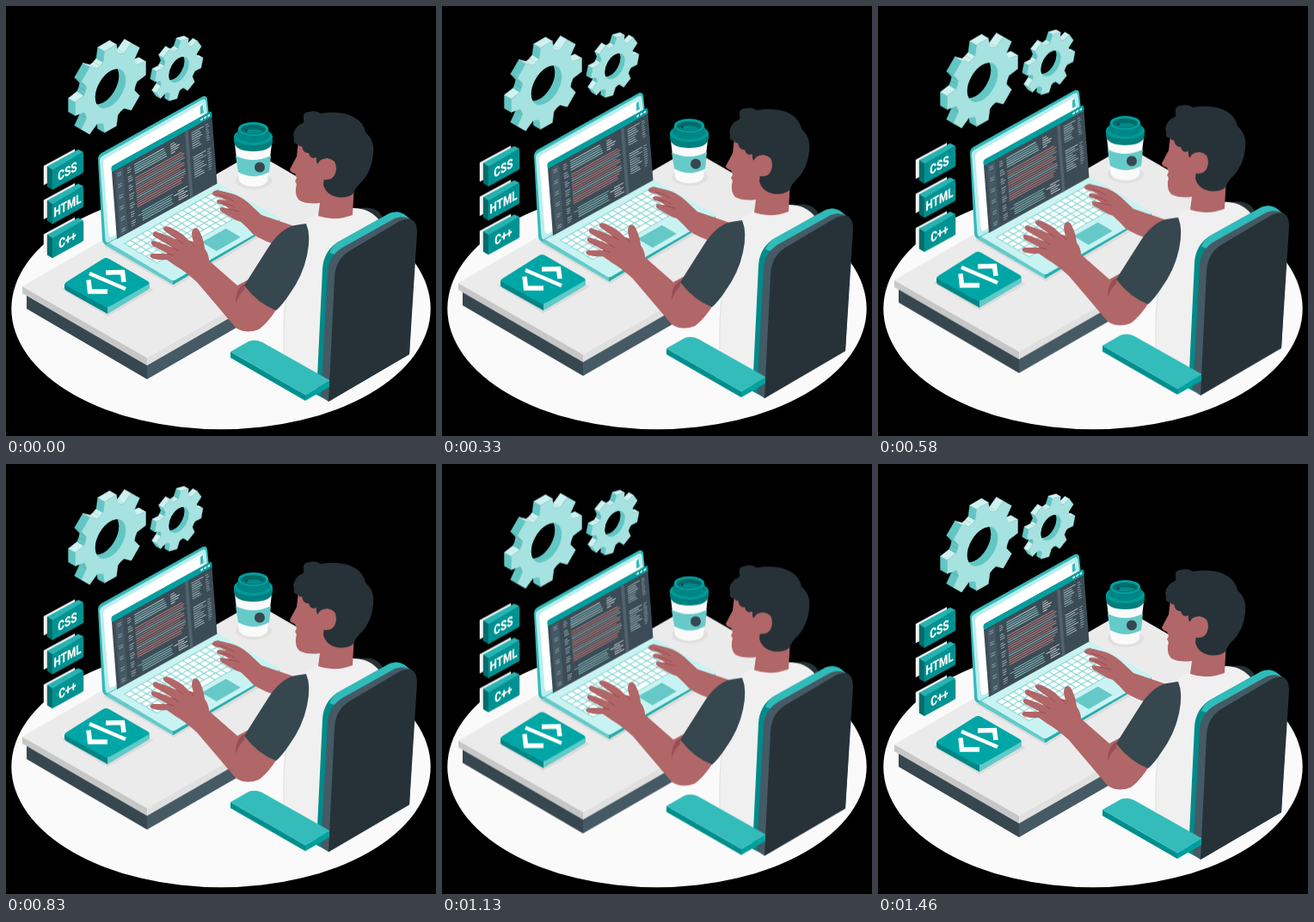
An HTML page that plays this animation: 500 px wide and 500 px high, repeating every 1500 ms.

```html
<!DOCTYPE html>
<html lang="en">
<head>
<meta charset="utf-8">
<title>Programmer at a desk</title>
<style>
  html, body { margin: 0; width: 100%; height: 100%; overflow: hidden; background: #000; }
  svg { display: block; width: 100vw; height: 100vh; }
  #scene { animation: float .75s steps(18, jump-none) infinite alternate; }
  @keyframes float { to { transform: translateY(-9.444px); } }
  .tag { font: 900 15.5px "Roboto", "Liberation Sans", sans-serif; fill: #fff; text-anchor: middle; }
  .skin { fill: #b16668; }
  .fold { fill: none; stroke: #964f55; stroke-width: 1; stroke-linecap: round; }
</style>
</head>
<body>
<svg viewBox="0 0 500 500">
  <ellipse cx="250" cy="352" rx="243.700" ry="140.300" fill="#fafafa"/>
  <g id="scene">
    <g id="gears"></g>

    <g id="desk">
      <path d="M24 335L164 416V434L24 352Z" fill="#37474f"/>
      <path d="M164 416L300 338V355.500L164 434Z" fill="#455a64"/>
      <path d="M19 326L164 409V418L19 334Z" fill="#c7c7c7"/>
      <path d="M164 409L310 325V334L164 418Z" fill="#e0e0e0"/>
      <path d="M19 326L289 170L400 234L310 325L164 409Z" fill="#ebebeb"/>
    </g>

    <g id="tags"></g>

    <g id="tile" stroke-linejoin="round">
      <path d="M66 329L116 300L170 330L118 360Z" fill="#dcdcdc" stroke="#dcdcdc" stroke-width="2"/>
      <path d="M68 323L118 350V358L70 331Q68 330 68 328Z" fill="#008686"/>
      <path d="M118 350L167 322V327Q167 329 165 330L118 358Z" fill="#5fcac8"/>
      <path d="M70 321L112 294.500Q116 292 120 294L165 320Q168 322 165 324L122 348.500Q118 351 114 349L70 325Q67 323 70 321Z" fill="#00a6a6"/>
      <g fill="none" stroke="#fff" stroke-width="5.500" stroke-linejoin="miter">
        <path d="M97 311L139 329" stroke-width="4.500"/>
        <path d="M116 310L135.500 309.500L137 321"/>
        <path d="M96 318.500L97.500 332L118 332"/>
      </g>
    </g>

    <g id="cup">
      <ellipse cx="288" cy="203" rx="21" ry="10" fill="#e0e0e0"/>
      <path d="M266 160L271 203Q275 210 288 210Q301 210 304 203L309 160Z" fill="#fafafa"/>
      <path d="M267 174Q287 184 308 174L306 193Q288 203 270 193Z" fill="#66cac9"/>
      <circle cx="295" cy="187.500" r="6" fill="#37474f"/>
      <path d="M265 151V158Q267 169 287.500 169Q308 169 310 158V151Z" fill="#007f7e"/>
      <ellipse cx="287.500" cy="152" rx="22.500" ry="10" fill="#009a99"/>
      <path d="M270 143L268 152Q275 159 288 159Q300 159 307 152L305 143Z" fill="#008685"/>
      <ellipse cx="287.500" cy="143" rx="17.500" ry="8" fill="#00a3a2"/>
      <ellipse cx="287.500" cy="143.500" rx="14.500" ry="5.800" fill="#006a69"/>
      <path d="M275 146Q287 140 300 146Q288 151 275 146Z" fill="#008b8a"/>
      <circle cx="279.500" cy="145" r="1.200" fill="#263238"/>
    </g>

    <g id="laptop">
      <path d="M113 279L195 327L322 253L243 207Z" fill="#dcdcdc"/>
      <path d="M114 272L194 318V324L117 279Q114 277 114 274Z" fill="#62cbca"/>
      <path d="M194 318L318 247V251L197 322.500Q195.500 324 194 324Z" fill="#22adac"/>
      <path d="M115 272L239 202L317 246Q319 248 317 249.500L197 318.500Q194.500 320 192 318.500Z" fill="#c9f3f2"/>
      <g id="keys" transform="matrix(1.22 -.7 .78 .46 117 272)">
        <path d="M5 17H95V67H5Z" fill="#92dbd9"/>
        <path d="M44 73H67V95H44Z" fill="#66c9c7"/>
      </g>
      <path d="M107 178Q107 174 111 171L229 105Q233 104 234 108L244 206L117 277Q113 278 112 272Z" fill="#35bab9"/>
      <path d="M109 180Q109 176 113 174L228 109Q232 107 232.500 111L243 206L119 275Q116 276 115.500 271Z" fill="#b9eeed"/>
      <path d="M113 182Q113 179 116 177L226 114.500Q229 113 229.500 116L238 205L124 268Q120 270 119.500 265Z" fill="#fff"/>
      <path d="M226 117L228.500 114.500L230 124L226 126Z" fill="#35bab9"/>
      <g id="editor" transform="matrix(1.165 -.645 .065 .845 122.500 186.500)">
        <path d="M2 0H98Q100 0 100 2V100H0V2Q0 0 2 0Z" fill="#3c4c56"/>
        <path d="M2 0H98Q100 0 100 2V8H0V2Q0 0 2 0Z" fill="#00a0a0"/>
        <path d="M3 10H11V98H3Z" fill="#455a64"/>
        <path d="M73 8H76V100H73Z" fill="#52636f"/>
        <g fill="#fff"><circle cx="90" cy="4" r="1.300"/><circle cx="93.500" cy="4" r="1.300"/><circle cx="97" cy="4" r="1.300"/></g>
      </g>
    </g>

    <g id="person">
      <path d="M405 237Q423 231 434 240Q441 247 440 262L412 270Z" fill="#263238"/>
      <!-- far arm -->
      <path class="skin" d="M240 217Q243 213 250 215L262 218Q273 221 282 229L297 243L338 257L318 279Q298 273 287 265Q280 257 273 251Q266 249 260 245L250 239Q247 235 251 234L260 236Q254 231 247 230Q243 227 247 225L256 226Q250 222 243 221Q239 219 240 217Z"/>
      <path class="fold" d="M248 220Q258 222 265 227M252 229Q260 230 266 234M257 236Q264 237 271 239"/>
      <!-- torso and head -->
      <path d="M364 241Q345 249 340 260L326 338Q322 360 323 404L345 450L372 446L440 300L435 250Q423 235 404 235Z" fill="#f0f0f0"/>
      <path d="M326 338Q322 360 323 404" fill="none" stroke="#dedede"/>
      <path class="skin" d="M340 157L338 175L330 190Q330 193 336 195L338 200L336 204Q339 207 337 211Q336 221 341 226Q350 231 365 229L363 244Q382 251 403 243L405 205L395 160L360 148Z"/>
      <path d="M340 161Q333 160 335 154Q332 146 341 138Q348 136 346 132Q344 124 352 123Q361 121 366 125Q391 121 406 130Q416 136 418 147Q429 156 427 173Q425 192 414 204Q407 210 404 218Q397 224 384 222Q372 219 369 208L370 199L363 184Q360 181 361 176Q354 179 352 171Q346 172 344 163Q341 164 340 161Z" fill="#263238"/>
      <path class="skin" d="M362 187Q363 177 373.500 177Q384 178 384 189Q383 202 372 202Q362 202 362 187Z"/>
      <!-- near arm -->
      <path class="skin" d="M184 257Q188 255 194 259Q204 263 213 273L218 274Q214 264 218 259Q223 256 226 264Q230 272 231 282Q236 289 236 296L269 325L282 318L315 352Q304 369 294 376Q279 382 267 374L222 321Q209 309 197 302L187 295Q177 296 169 293Q165 290 170 288L188 288L171 279Q167 276 170 273Q175 273 194 281L172 268Q169 264 173 262Q181 264 199 272L185 262Q181 259 184 257Z"/>
      <path class="fold" d="M194 281L201 285M199 272L206 276M188 288L195 290M213 273Q217 276 219 279"/>
      <path d="M277 323Q267 328 267 346Q271 335 277 330Z" fill="#964f55"/>
      <path d="M349 253Q355 267 350 290Q345 314 329 336Q321 348 314 354Q293 346 277 325Q289 306 303 284Q318 259 336 255Z" fill="#37474f"/>
    </g>

    <g id="chair">
      <path d="M361 452L368 306Q369 286 385 275L446 241Q456 237 464 243L476 253L382 330L371 457Z" fill="#008b8a"/>
      <path d="M376 287Q379 279 387 274L446 241Q456 237 464 243L470 248L388 291Z" fill="#2fbbba"/>
      <path d="M366 454L374 309Q375 291 391 281L452 247Q462 243 470 248L477 260L469 405L375 460Z" fill="#455a64"/>
      <path d="M375 460L382 316Q383 295 399 285L458 250Q478 241 478 264L469 405Z" fill="#263238"/>
      <path d="M261 402L348 452V459L261 409Z" fill="#008f8e"/>
      <path d="M348 452L376 436V443L348 459Z" fill="#00a09f"/>
      <path d="M261 402L282 390Q290 387 298 391L376 435V436L348 452Z" fill="#34bcbb"/>
    </g>
  </g>
</svg>
<script>
  const NS = "http://www.w3.org/2000/svg";
  const $ = id => document.getElementById(id);

  function add(parent, tag, attrs, text) {
    const el = document.createElementNS(NS, tag);
    for (const k in attrs) el.setAttribute(k, attrs[k]);
    if (text) el.textContent = text;
    return parent.appendChild(el);
  }
  const poly = (parent, pts, fill) => add(parent, "path", {
    d: "M" + pts.map(p => p.map(n => n.toFixed(2))).join("L") + "Z",
    fill, stroke: fill, "stroke-width": .4, "stroke-linejoin": "round"
  });

  // Extruded cog on the right-hand isometric plane.
  function gear(id, cx, cy, r, hole, turn, depth) {
    const dx = depth * .866, dy = depth * .5;
    const iso = ([u, v]) => [cx + u * .866, cy + v - u * .5];
    const back = ([x, y]) => [x - dx, y - dy];
    const plane = (x, y) => `matrix(.866 -.5 0 1 ${x} ${y})`;
    const flat = [];
    for (let i = 0; i < 8; i++) {
      for (const [a, k] of [[-15.5, .77], [-9.5, 1], [9.5, 1], [15.5, .77], [22.5, .75]]) {
        const t = (i * 45 + turn + a) * Math.PI / 180;
        flat.push([Math.cos(t) * r * k, Math.sin(t) * r * k]);
      }
    }
    const g = add($("gears"), "g", {});
    flat.forEach((p, i) => {
      const q = flat[(i + 1) % flat.length];
      const a = iso(p), b = iso(q);
      if ((b[0] - a[0]) * dy <= (b[1] - a[1]) * dx) return;
      const top = q[0] - p[0] > p[1] - q[1];
      poly(g, [a, b, back(b), back(a)], top ? "#cdf2f1" : "#62c6c4");
    });
    poly(g, flat.map(iso), "#a5e2e0");
    const clip = add(g, "clipPath", { id });
    add(clip, "circle", { r: hole, transform: plane(cx, cy) });
    add(g, "circle", { r: hole, transform: plane(cx, cy), fill: "#62c6c4" });
    const inner = add(g, "g", { "clip-path": `url(#${id})` });
    add(inner, "circle", { r: hole, fill: "#000", transform: plane(cx - dx, cy - dy) });
  }
  gear("bore1", 121.5, 96, 48, 20.5, 0, 9.2);
  gear("bore2", 201, 74, 32.5, 13.5, 14, 6);

  ["CSS", "HTML", "C++"].forEach((name, i) => {
    const g = add($("tags"), "g", { transform: `translate(0 ${i * 39.7})` });
    poly(g, [[44, 186], [80, 166.5], [80, 190], [44, 208]], "#f2f2f2");
    poly(g, [[48, 186.5], [84, 167], [90, 170], [54, 190.5]], "#27b3b2");
    poly(g, [[48, 186.5], [54, 190.5], [54, 213.5], [48, 210]], "#006c6c");
    poly(g, [[54, 190.5], [88.5, 170.5], [90, 171.5], [90, 193], [88.5, 194.5], [54, 213.5]], "#009292");
    add(g, "text", { class: "tag", transform: "matrix(.76 -.42 0 1 71.500 197.500)" }, name);
  });

  const key = (x, y, width) =>
    add($("keys"), "rect", { x, y, width, height: 6.6, rx: .8, fill: "#fff" });
  for (let row = 0; row < 6; row++) {
    for (let col = 0; col < 16; col++) {
      if (row === 5 && col > 4 && col < 10) continue;
      key(6 + col * 5.55, 18.5 + row * 8.1, 4.5);
    }
  }
  key(33.75, 59, 26.7);

  let seed = 11;
  const rnd = () => (seed = seed * 16807 % 2147483647) / 2147483647;
  const dash = (x, y, width, fill) => add($("editor"), "rect", { x, y, width, height: 1.1, fill });
  for (let i = 0; i < 27; i++) {
    const y = 14 + i * 3.05;
    const dense = i > 5 && i < 20;
    const hue = dense ? (i % 6 === 3 ? "#6ccfce" : "#cf7d7c") : (i % 3 ? "#7fd0cf" : "#d5dcde");
    if (i % 4 < 3) dash(15, y, 3 + rnd() * 2, "#9fb2ba");
    if (i % 5 < 2) dash(5, y, 4, "#90a4ae");
    if (dense || i < 5 || i > 21) {
      const x = 22 + (dense ? 0 : Math.floor(rnd() * 2) * 4);
      dash(x, y, (dense ? 44 : 28) + rnd() * 5, hue);
      if (!dense) dash(x + 36, y, 4 + rnd() * 6, "#d5dcde");
    }
    if (i < 8 || (i > 10 && i < 21)) {
      dash(79, y, 7 + rnd() * 6, "#a9c4c8");
      dash(93, y, 2 + rnd() * 2, "#8fa5ad");
    }
  }
</script>
</body>
</html>
```
